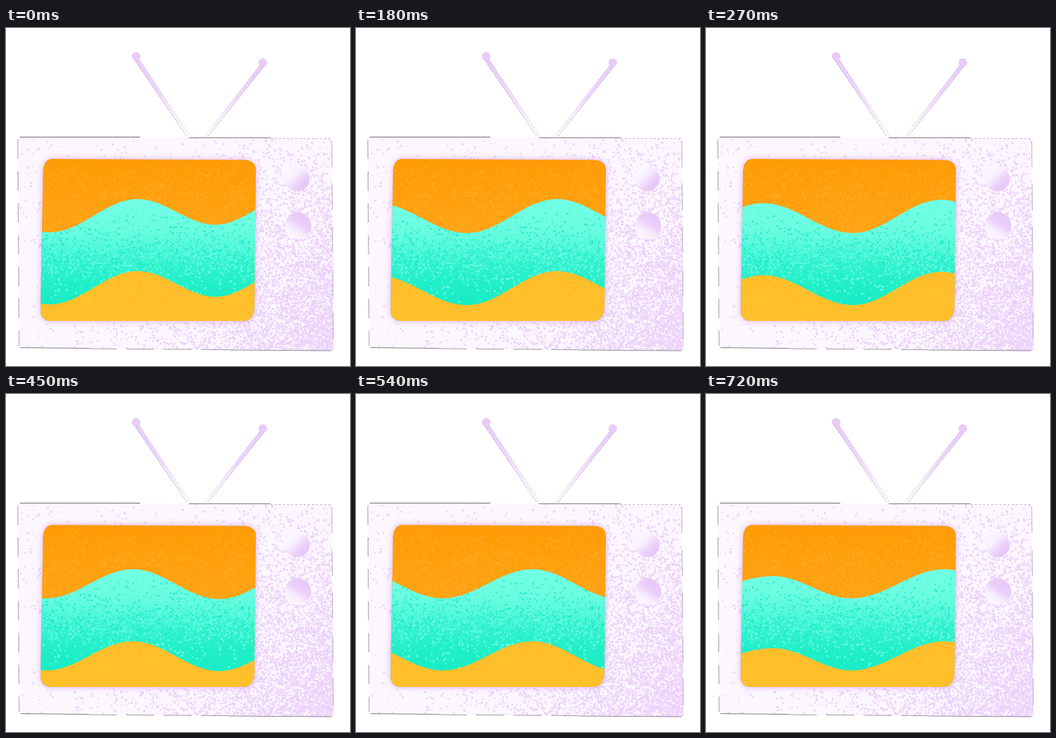
An HTML page with a canvas that plays this animation: 497 px wide and 488 px high, repeating every 810 ms.

```html
<!DOCTYPE html>
<html lang="en">
<head>
<meta charset="utf-8">
<title>Television</title>
<style>
html, body { margin: 0; width: 100%; height: 100%; overflow: hidden; background: #fff; }
canvas { display: block; }
</style>
</head>
<body>
<canvas id="stage" width="497" height="488"></canvas>
<script>
const W = 497, H = 488, STEP = 90, BAND = 104;
const ctx = document.getElementById('stage').getContext('2d');

const bodyShape = new Path2D('M21 157.5L468 159.5Q470.5 160 470.5 163L473 463Q473 466 469 466L23 461.5Q19.5 461 19.5 458L17 162Q17 158 21 157.5Z');
const screenShape = new Path2D('M66 189L343 190.5Q361 191 361 205L359 402Q358 422 344 423L65 423Q50 422 50 407L53.5 206Q55 190 66 189Z');

// Turning points of the wave at each step: x, y pairs alternating crest and trough.
const poses = [
  [[-60, 247], [63, 295], [190, 247], [303, 284], [407, 247]],
  [[-15, 250], [112, 295], [240, 247], [360, 288], [480, 247]],
  [[30, 253], [160, 296], [290, 247], [415, 290]],
  [[-45, 295], [83, 253], [212, 296], [340, 248], [470, 295]],
  [[10, 296], [135, 253], [262, 296], [395, 243]],
  [[-65, 253], [58, 295], [183, 253], [308, 296], [430, 253]],
  [[0, 255], [125, 295], [255, 253], [380, 296]],
  [[-70, 292], [50, 258], [167, 295], [300, 253], [430, 296]],
  [[-10, 282], [97, 263], [210, 295], [345, 253], [470, 296]]
];

function seeded(seed) {
  return () => {
    seed = (seed + 0x6D2B79F5) | 0;
    let t = Math.imul(seed ^ (seed >>> 15), 1 | seed);
    t = (t + Math.imul(t ^ (t >>> 7), 61 | t)) ^ t;
    return ((t ^ (t >>> 14)) >>> 0) / 4294967296;
  };
}

function layer(paint) {
  const c = document.createElement('canvas');
  c.width = W;
  c.height = H;
  paint(c.getContext('2d'));
  return c;
}

function gradient(g, [x0, y0, x1, y1], ...stops) {
  const fill = g.createLinearGradient(x0, y0, x1, y1);
  stops.forEach(([at, color]) => fill.addColorStop(at, color));
  return fill;
}

// Scatter small square specks; density(x, y) is the chance of one per cell.
function grain(g, [x0, y0, x1, y1], color, seed, density) {
  const rnd = seeded(seed);
  g.fillStyle = color;
  for (let y = y0; y < y1; y += 2) {
    for (let x = x0; x < x1; x += 2) {
      if (rnd() < density(x, y)) {
        const size = 1.5 + rnd() * 1.5;
        g.fillRect(x + rnd(), y + rnd(), size, size);
      }
    }
  }
}

function line(g, points, color, width, dash = []) {
  g.beginPath();
  points.forEach(([x, y]) => g.lineTo(x, y));
  g.setLineDash(dash);
  g.strokeStyle = color;
  g.lineWidth = width;
  g.stroke();
  g.setLineDash([]);
}

function antenna(g, ball, foot, side) {
  const [bx, by] = ball, [fx, fy] = foot;
  const a = [bx - 3 * side, by + 4], b = [bx + 3 * side, by + 2];
  const c = [fx + 2.5, fy], d = [fx - 2.5, fy];
  const [outer, inner] = side > 0 ? [d, c] : [c, d];
  g.fillStyle = gradient(g, [bx, by, fx, fy], [0, '#e8c8fa'], [0.45, '#eed8fc'], [0.75, '#f8effe'], [1, '#fdfaff']);
  g.beginPath();
  [a, b, inner, outer].forEach(p => g.lineTo(...p));
  g.fill();
  line(g, [a, outer], '#77667f', 0.6, [2, 2]);
  line(g, [b, inner], '#77667f', 0.6, [1, 3]);
  g.fillStyle = '#e9caf9';
  g.beginPath();
  g.arc(bx, by, 6, 0, 7);
  g.fill();
  g.strokeStyle = '#a58ab0';
  g.lineWidth = 0.5;
  g.setLineDash([1, 3]);
  g.stroke();
  g.setLineDash([]);
}

function knob(g, x, y, r, axis, ...stops) {
  g.fillStyle = gradient(g, axis, ...stops);
  g.beginPath();
  g.arc(x, y, r, 0, 7);
  g.fill();
}

const cabinet = layer(g => {
  g.fillStyle = '#fff';
  g.fillRect(0, 0, W, H);
  antenna(g, [188, 41], [264, 157], 1);
  antenna(g, [371, 50], [289, 157], -1);

  g.fillStyle = '#fcf7ff';
  g.fill(bodyShape);
  g.save();
  g.clip(bodyShape);
  grain(g, [16, 156, 474, 468], '#ecd1fb', 7, (x, y) => {
    const u = Math.max(0, (x - 17) / 455), v = Math.max(0, (y - 158) / 308);
    return 0.02 + u ** 2.5 * (0.04 + 0.85 * v);
  });
  g.shadowColor = '#dcabf5';
  g.shadowBlur = 9;
  g.fillStyle = '#e6c4f8';
  g.fill(screenShape);
  g.restore();

  const edge = '#4d4650';
  line(g, [[20, 157.5], [194, 157.5]], edge, 0.8);
  line(g, [[264, 158.5], [382, 158.5]], edge, 0.7);
  line(g, [[382, 159.5], [469, 159.5]], '#9d8ca5', 0.6, [3, 3]);
  line(g, [[17, 161], [19, 459]], '#77707a', 0.7, [28, 18]);
  line(g, [[21, 461.5], [120, 462.5]], edge, 0.7);
  line(g, [[120, 463], [322, 464.5]], '#77707a', 0.7, [40, 14]);
  line(g, [[322, 465], [470, 466]], edge, 0.6);
  line(g, [[470.7, 163], [473, 463]], '#8f7f96', 0.6, [38, 24]);

  g.fillStyle = '#fbf5ff';
  [[421, 217, 18], [422, 286, 19]].forEach(([x, y, r]) => {
    g.beginPath();
    g.arc(x, y, r, 0, 7);
    g.fill();
  });
  knob(g, 420.5, 217.5, 18, [411, 206, 433, 229], [0, '#fbf5ff'], [0.3, '#f8effe'], [0.65, '#ecd2fa'], [1, '#e6c4f7']);
  knob(g, 422, 285.5, 19, [431, 270, 411, 300], [0, '#e8c7f9'], [0.4, '#ebcffa'], [0.7, '#f7ecfe'], [1, '#fcf7ff']);
});

const inside = [48, 186, 364, 426];

const backdrop = layer(g => {
  g.fillStyle = gradient(g, [0, 190, 0, 300], [0, '#ff9c05'], [1, '#ffa213']);
  g.fillRect(48, 186, 316, 240);
  grain(g, inside, '#ffaa22', 21, (x, y) => 0.03 + 0.22 * Math.max(0, (y - 195) / 105));
});

const floorLayer = layer(g => {
  g.fillStyle = '#ffc02c';
  g.fillRect(48, 186, 316, 240);
  grain(g, inside, '#fcb92a', 33, (x, y) => 0.2 * Math.max(0, (410 - y) / 60));
});

const water = layer(g => {
  g.fillStyle = gradient(g, [0, 245, 0, 400], [0, '#74ffe6'], [0.3, '#6cfce1'], [0.55, '#42f5d3'], [0.8, '#20efc8'], [1, '#15ecc3']);
  g.fillRect(48, 186, 316, 240);
  grain(g, inside, '#24eccb', 45, (x, y) => 0.2 * Math.min(1, Math.max(0, (y - 260) / 65)));
  grain(g, inside, '#66fbdf', 57, (x, y) => 0.17 * Math.min(1, Math.max(0, (395 - y) / 70)));
});

function waveY(points, x) {
  let i = 0;
  while (i < points.length - 2 && x > points[i + 1][0]) i++;
  const [x0, y0] = points[i], [x1, y1] = points[i + 1];
  const t = (x - x0) / (x1 - x0);
  return y0 + (y1 - y0) * (1 - Math.cos(Math.PI * t)) / 2;
}

function below(points, offset) {
  const path = new Path2D();
  path.moveTo(46, H);
  for (let x = 46; x <= 366; x += 2) path.lineTo(x, waveY(points, x) + offset);
  path.lineTo(366, H);
  return path;
}

function drawClipped(image, path) {
  ctx.save();
  ctx.clip(path);
  ctx.drawImage(image, 0, 0);
  ctx.restore();
}

function render(pose) {
  ctx.drawImage(cabinet, 0, 0);
  ctx.save();
  ctx.clip(screenShape);
  ctx.drawImage(backdrop, 0, 0);
  drawClipped(water, below(pose, 0));
  drawClipped(floorLayer, below(pose, BAND));
  ctx.restore();
}

const start = performance.now();
let shown = -1;

function tick() {
  const index = Math.floor((performance.now() - start) / STEP) % poses.length;
  if (index !== shown) {
    shown = index;
    render(poses[index]);
  }
  requestAnimationFrame(tick);
}
tick();
</script>
</body>
</html>
```
